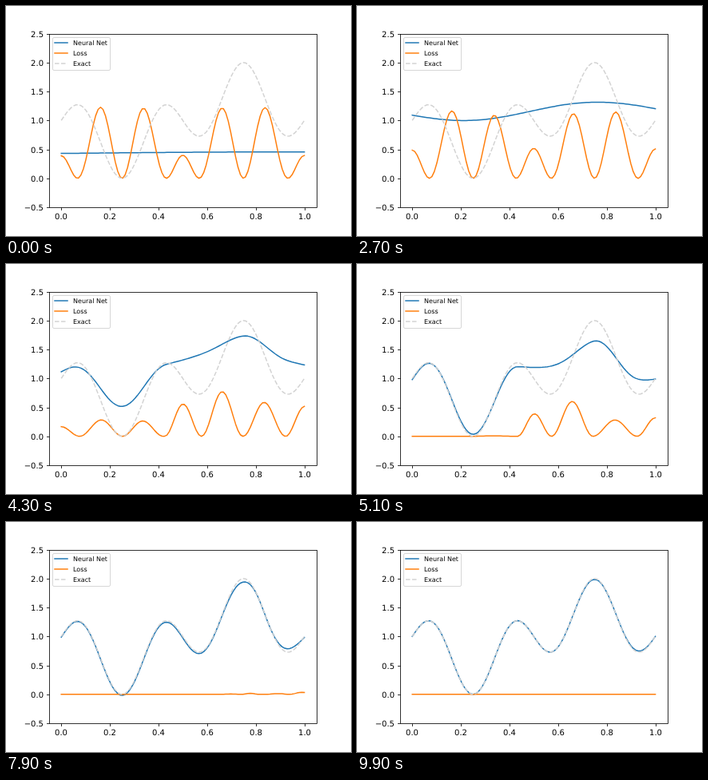
Recreate the animation shown at these times as an HTML page. Size 432 by 288 pixels, loop 10000 ms.

```html
<!DOCTYPE html>
<html lang="en">
<head>
<meta charset="utf-8">
<title>Curve fitting</title>
<style>
  html, body { margin: 0; width: 100%; height: 100%; overflow: hidden; background: #fff; }
  svg { display: block; width: 432px; height: 288px; }
  text { font-family: "DejaVu Sans", Verdana, sans-serif; font-size: 10px; fill: #000; text-rendering: geometricPrecision; }
  .axis { fill: none; stroke: #000; stroke-width: .8; }
  .curve { fill: none; stroke-width: 1.5; stroke-linejoin: round; stroke-linecap: square; }
  .net { stroke: #1f77b4; }
  .loss { stroke: #ff7f0e; }
  .exact { stroke: #d3d3d3; stroke-dasharray: 5.55 2.4; stroke-linecap: butt; }
  .legend text { font-size: 8px; }
</style>
</head>
<body>
<svg id="stage" viewBox="0 0 432 288"></svg>
<script>
const LOOP = 10000, STEP = 100, LAST = 99;
const { PI, sin, cos, round, floor } = Math;
const stage = document.getElementById('stage');

const px = x => 69.218 + 304.364 * x;
const py = y => 215.76 - 72.48 * y;
const xs = Array.from({ length: LAST + 1 }, (_, i) => i / LAST);

const exact = x => 1 + sin(2 * PI * x) * cos(4 * PI * x);
const exactSlope = x => PI * (3 * cos(6 * PI * x) - cos(2 * PI * x));

// Each stage of training is a wave given by its crests and troughs [x, y].
// Fitted stages describe the distance to the exact curve instead.
// power eases the way to the next stage.
const stages = [
  { t: 0, power: .6, turns: [[-1, .403], [1, .457]] },
  { t: 1800, power: 1.6, turns: [[0, 1], [2, 1.09]] },
  { t: 3500, power: 1, turns: [[-.215, 1.51], [.215, .99], [.75, 1.82], [1.44, .64]] },
  { t: 5100, power: .6, fitted: true, turns: [[0, -.02], [.24, .035], [.433, -.07],
    [.573, .485], [.743, -.355], [.925, .26], [1.075, -.28]] },
  { t: 6800, power: .7, fitted: true, turns: [[0, -.03], [.66, -.04], [.737, -.09],
    [.803, -.015], [.85, -.035], [.94, .1], [1.07, -.24]] },
  { t: 9000, power: 1, fitted: true, turns: [[0, 0], [.54, -.02], [.63, 0],
    [.745, -.045], [.825, .01], [.94, .035], [1.01, 0]] },
  { t: 9900, fitted: true, turns: [[0, 0], [.6, 0], [.74, -.015], [.93, .02], [1.01, 0]] }
];

// Value and slope of the half cosine between the turns around x.
function wave(turns, x) {
  const i = turns.findIndex(([end], k) => k && x <= end);
  const [x0, y0] = turns[i - 1], [x1, y1] = turns[i];
  const width = x1 - x0, rise = y1 - y0, angle = PI * (x - x0) / width;
  return [y0 + rise * (1 - cos(angle)) / 2, PI * rise * sin(angle) / (2 * width)];
}

for (const s of stages) {
  const waves = xs.map(x => wave(s.turns, x));
  s.net = waves.map(([y], i) => s.fitted ? y + exact(xs[i]) : y);
  s.error = waves.map(([, g], i) => s.fitted ? g : g - exactSlope(xs[i]));
}

function add(name, attrs, parent = stage) {
  const el = document.createElementNS('http://www.w3.org/2000/svg', name);
  for (const key in attrs) el.setAttribute(key, attrs[key]);
  return parent.appendChild(el);
}
function label(x, y, text, anchor, parent) {
  add('text', { x, y, 'text-anchor': anchor }, parent).textContent = text;
}
const points = ys => ys.map((y, i) => px(xs[i]).toFixed(2) + ',' + py(y).toFixed(2)).join(' ');
const snap = v => round(v) + .5;

const [net, loss, target] = ['net', 'loss', 'exact'].map(c => add('polyline', { class: 'curve ' + c }));
target.setAttribute('points', points(xs.map(exact)));

for (let i = 0; i <= 5; i++) {
  const x = px(i / 5);
  add('path', { class: 'axis', d: `M${snap(x)} 252.5v3.5` });
  label(round(x), 267, (i / 5).toFixed(1), 'middle');
}
for (let i = -1; i <= 5; i++) {
  const y = py(i / 2);
  add('path', { class: 'axis', d: `M54.5 ${snap(y)}h-3.5` });
  label(47, round(y) + 4, (i / 2).toFixed(1).replace('-', '\u2212'), 'end');
}
add('rect', { class: 'axis', x: 54.5, y: 35.5, width: 335, height: 217 });

const legend = add('g', { class: 'legend' });
add('rect', { x: 58.5, y: 39.5, width: 72, height: 41, rx: 1.6,
  fill: '#fff', 'fill-opacity': .8, stroke: '#ccc', 'stroke-opacity': .8 }, legend);
[['net', 'Neural Net'], ['loss', 'Loss'], ['exact', 'Exact']].forEach(([name, text], i) => {
  const y = 46 + 13 * i;
  add('path', { class: 'curve ' + name, d: `M61 ${y}h16` }, legend);
  label(84, y + 3, text, 'start', legend);
});

let shown = -1;
function draw(now) {
  const t = STEP * floor(now % LOOP / STEP);
  if (t === shown) return;
  shown = t;
  const next = stages.findIndex((s, k) => k && t <= s.t);
  const a = stages[next - 1], b = stages[next];
  const u = ((t - a.t) / (b.t - a.t)) ** a.power;
  const mix = key => a[key].map((v, i) => v + (b[key][i] - v) * u);
  net.setAttribute('points', points(mix('net')));
  loss.setAttribute('points', points(mix('error').map(e => e * e / 100)));
}

const begin = performance.now();
function tick() {
  draw(performance.now() - begin);
  requestAnimationFrame(tick);
}
tick();
</script>
</body>
</html>
```
